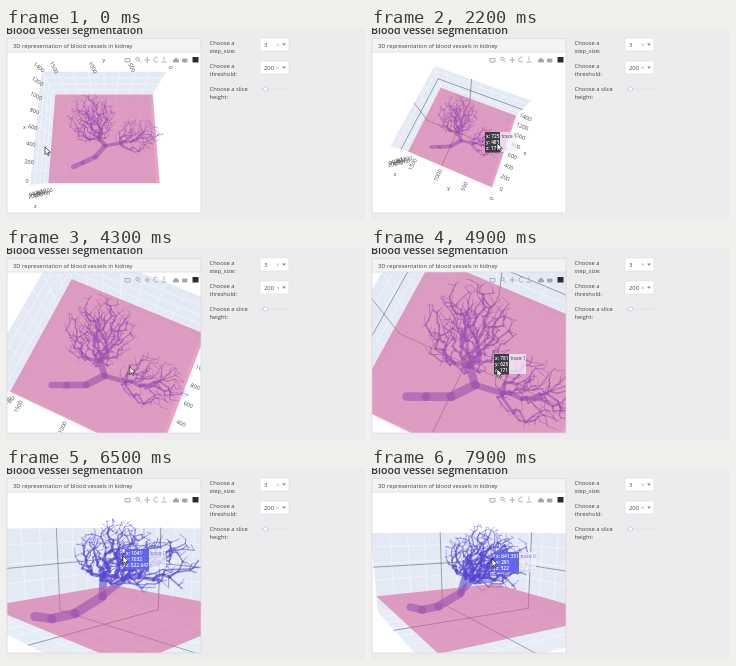
These frames come from a looping animation (359 px wide and 192 px high, 8000 ms). An HTML page with a canvas:

```html
<!DOCTYPE html>
<html lang="en">
<head>
<meta charset="utf-8">
<title>Blood vessel segmentation</title>
<style>
  html, body { margin: 0; width: 100%; height: 100%; overflow: hidden; background: #edebed; }
  canvas, svg { position: absolute; left: 0; top: 0; width: 359px; height: 192px; }
  text { font: 5.8px "Open Sans", "Noto Sans", sans-serif; fill: #444; }
  .title { font-size: 10.6px; font-weight: 600; fill: #333; }
  .box { fill: #fff; stroke: #dddbdf; stroke-width: .6; }
  .icon { fill: none; stroke: #a5a5ab; stroke-width: .9; }
</style>
</head>
<body>
<canvas id="plot"></canvas>
<svg viewBox="0 0 359 192">
  <text class="title" x="0" y="5.5">Blood vessel segmentation</text>
  <path d="M1 10.5H195V24H1Z" fill="#f4f3f4"/>
  <path d="M1 10.5H195V185H1ZM1 24H195" fill="none" stroke="#d9d7da" stroke-width=".7"/>
  <text x="7" y="19.5">3D representation of blood vessels in kidney</text>
  <g class="icon">
    <path d="M119 30.5H124V34H119Z"/>
    <circle cx="131.5" cy="31" r="1.7"/><path d="M133 32.5L135 34.5"/>
    <path d="M138.500 32H144M141.2 29V35"/>
    <path d="M151.500 29.5A2.5 2.5 0 1 0 152 33.5"/>
    <path d="M158 28.5V32.5M155.500 34H160.5"/>
    <path d="M167.500 32L170 30L172.500 32V34H167.500ZM176.500 31H181V34H176.500Z" fill="#a5a5ab"/>
  </g>
  <rect x="186.5" y="29" width="6" height="5.5" fill="#2a2a30"/>
  <text x="203.5" y="16.5">Choose a</text><text x="203.5" y="25">step_size:</text>
  <text x="203.5" y="39.8">Choose a</text><text x="203.5" y="48.3">threshold:</text>
  <text x="203.5" y="62.5">Choose a slice</text><text x="203.5" y="71">height:</text>
  <rect class="box" x="254" y="10" width="29" height="13" rx="1.5"/>
  <rect class="box" x="254" y="33" width="29" height="13" rx="1.5"/>
  <text x="258" y="18.7">3</text><text x="258" y="41.7">200</text>
  <path d="M270.500 15.500l2.400 2.400m0-2.400l-2.400 2.400M270.500 38.500l2.400 2.400m0-2.400l-2.400 2.400" stroke="#aaa" stroke-width=".6"/>
  <path d="M276 15.500h4l-2 2.300zM276 38.500h4l-2 2.300z" fill="#888"/>
  <path d="M254 61H283" stroke="#e2e1e6" stroke-width="1.2"/>
  <circle cx="259.5" cy="61" r="2.2" fill="#fff" stroke="#a9d3f0" stroke-width=".9"/>
</svg>
<script>
const cv = document.getElementById('plot'), c = cv.getContext('2d');
const dpr = window.devicePixelRatio || 1;
cv.width = 359 * dpr;
cv.height = 192 * dpr;

const FONT = '"Open Sans", "Noto Sans", sans-serif';
const W = .5, D = .4375, TOP = .38, LOW = -.1, EYE = 1.6; // half width, half depth, z limits, eye distance
const HOVER = [-.1, 0, .18];

// cam: yaw, tilt, scale, centre x and y, pointer x and y; tip: offset from the pointer
const stops = [
  { t: 0, cam: [0, .245, 104, 98, 108, 40, 123] },
  { t: 1300, cam: [.38, .25, 104, 97, 109, 108, 119], tip: [-7, -13], text: ['596.363', '777', '514'] },
  { t: 2200, cam: [.39, .25, 86, 93, 105, 127, 119], tip: [-13, -15], text: ['725', '483', '171'], slice: true },
  { t: 3600, cam: [.42, .25, 95, 95, 108, 122, 120], tip: [15, -7], text: ['693', '189', '549.647'] },
  { t: 4900, cam: [.43, .22, 200, 112, 119, 127, 125], tip: [-4, -19], text: ['781', '625', '171'], slice: true },
  { t: 6500, cam: [.8, 1.32, 205, 112, 141, 118, 92], tip: [1, -11], text: ['1041', '1032', '522.647'] },
  { t: 7900, cam: [1.05, 1.32, 183, 107, 137, 122, 95], tip: [2, -11], text: ['641.351', '291', '522'] }
];

function pose(t) {
  let i = 0;
  while (i < stops.length - 2 && t >= stops[i + 1].t) i++;
  const a = stops[i], b = stops[i + 1];
  const k = Math.min(1, (t - a.t) / (b.t - a.t)), ease = k * k * (3 - 2 * k);
  return a.cam.map((v, j) => v + (b.cam[j] - v) * ease);
}

// Orbit camera with perspective; returns x, y and local scale.
function camera(yaw, tilt, scale, cx, cy) {
  const cw = Math.cos(yaw), sw = Math.sin(yaw), ct = Math.cos(tilt), st = Math.sin(tilt);
  return ([x, y, z]) => {
    const rx = x * cw - y * sw, ry = x * sw + y * cw;
    const s = scale / Math.max(.15, 1 - (ry * st + z * ct) / EYE);
    return [cx + rx * s, cy + (ry * ct - z * st) * s, s];
  };
}

// Vessel tree: scattered tips, each joined to the best node nearer the hub.
let seed = 11;
const rnd = () => (seed = (seed * 16807) % 2147483647) / 2147483647;
const dist = (a, b) => Math.hypot(a[0] - b[0], a[1] - b[1], a[2] - b[2]);

function scatter(n, mid, radii) {
  return Array.from({ length: n }, () => {
    const a = rnd() * 2 * Math.PI, k = 2 * rnd() - 1, r = rnd() ** .4, q = Math.sqrt(1 - k * k);
    const dir = [q * Math.cos(a), q * Math.sin(a), k];
    return mid.map((m, i) => m + dir[i] * r * radii[i]);
  });
}

const nodes = [];
function join(p, parent) {
  const path = parent ? parent.path + dist(p, parent.p) : 0;
  nodes.push({ p, parent, path, load: 0 });
  return nodes[nodes.length - 1];
}
const hub = [.01, .11, .08];
let stem = null;
for (const p of [[-.29, .29, -.04], [-.2, .25, -.04], [-.08, .2, 0], hub]) stem = join(p, stem);
const tips = [...scatter(520, [-.1, -.09, .26], [.21, .22, .17]), ...scatter(260, [.28, .06, .25], [.19, .16, .13])];
tips.sort((a, b) => dist(a, hub) - dist(b, hub));
for (const p of tips) {
  let best = stem, cost = Infinity;
  for (const n of nodes.slice(3)) {
    const d = dist(p, n.p) + .25 * (n.path - stem.path);
    if (d < cost) { best = n; cost = d; }
  }
  join(p, best);
}
for (const n of nodes) for (let m = n; m; m = m.parent) m.load++;

function trace(points) {
  c.beginPath();
  for (const [x, y] of points) c.lineTo(x, y);
}
function line(points, color, width) {
  trace(points);
  c.strokeStyle = color;
  c.lineWidth = width;
  c.stroke();
}
function fill(points, color) {
  trace(points);
  c.fillStyle = color;
  c.fill();
}
const level = (P, z) => [[-W, -D, z], [W, -D, z], [W, D, z], [-W, D, z]].map(P);

function walls(P) {
  fill(level(P, LOW), '#e6edf7');
  for (let s = -1; s <= 1; s += .25) {
    line([P([s * W, -D, LOW]), P([s * W, D, LOW])], '#f6f9ff', .6);
    line([P([-W, s * D, LOW]), P([W, s * D, LOW])], '#f6f9ff', .6);
  }
  for (const at of [(s, z) => [s * W, -D, z], (s, z) => [-W, s * D, z]]) {
    fill([at(-1, LOW), at(1, LOW), at(1, TOP), at(-1, TOP)].map(P), '#e3eaf5');
    for (let s = -1; s <= 1; s += .25) line([P(at(s, LOW)), P(at(s, TOP))], '#f6f9ff', .6);
    for (let z = 0; z < TOP; z += .1) line([P(at(-1, z)), P(at(1, z))], '#f6f9ff', .6);
  }
}

function vessels(P) {
  for (const n of nodes) {
    if (!n.parent) continue;
    const a = P(n.p), b = P(n.parent.p);
    line([a, b], 'rgba(85,72,208,.6)', Math.max(.4, .003 * a[2] * n.load ** .4));
  }
}

function label(s, x, y, rot = 0) {
  c.save();
  c.translate(x, y);
  c.rotate(rot);
  c.fillText(s, 0, 0);
  c.restore();
}

function axes(P, back) {
  c.font = '5.5px ' + FONT;
  c.fillStyle = '#444';
  c.textAlign = 'center';
  c.textBaseline = 'middle';
  const xAt = n => P(back ? [-W, D - n / 1600, TOP] : [W, D - n / 1600, 0]);
  const yAt = n => P(back ? [W - n / 1600, -D, TOP] : [W - n / 1600, D, 0]);
  for (let n = 0; n <= 1400; n += 200) {
    const [x, y] = xAt(n);
    label(n, x + (back ? -3 : 9), y + (back ? -4 : 2), back ? n / 2000 : .4);
  }
  for (let n = 0; n <= 1500; n += 500) {
    const [x, y] = yAt(n);
    label(n, x + (back ? 4 : 0), y + (back ? -4 : 11), back ? 1.1 : -1.1);
  }
  const [zx, zy] = P([-W, D, 0]);
  for (let n = 0; n < 7; n++) label(n * 200, zx - 18 + n * 2.7, zy + 12 - n * .7 + n % 2 * 2, -.1);
  const [xx, xy] = xAt(700), [yx, yy] = yAt(800);
  label('x', xx + (back ? -12 : 20), xy + 4);
  label('y', yx, yy + (back ? -11 : 20));
  label('z', zx - 13, zy + 23);
}

function spikes(P, [x, y, z]) {
  for (const ends of [[[-W, -D, z], [W, -D, z]], [[-W, -D, z], [-W, D, z]], [[x, -D, LOW], [x, -D, TOP]],
    [[-W, y, LOW], [-W, y, TOP]], [[x, -D, LOW], [x, D, LOW]], [[-W, y, LOW], [W, y, LOW]]])
    line(ends.map(P), 'rgba(60,55,70,.75)', .6);
}

function tooltip({ tip, text, slice }, mx, my) {
  const x = mx + tip[0], y = my + tip[1], w = slice ? 15 : 24, color = slice ? '#3d3b43' : '#6166ea';
  c.textAlign = 'left';
  c.textBaseline = 'alphabetic';
  c.fillStyle = 'rgba(240,240,252,.75)';
  c.fillRect(x + w, y, 17, 20);
  c.fillStyle = color;
  c.fillRect(x, y, w, 20.5);
  c.font = '4.8px ' + FONT;
  c.fillText('trace ' + (slice ? 1 : 0), x + w + 1.5, y + 6);
  c.font = '600 4.8px ' + FONT;
  c.fillStyle = '#fff';
  text.forEach((s, i) => c.fillText('xyz'[i] + ': ' + s, x + 1, y + 6 + i * 6.2));
}

function arrow(x, y) {
  const shape = [[0, 0], [0, 7.5], [1.8, 6], [3, 8.6], [4.2, 8], [3, 5.5], [5.4, 5.3], [0, 0]]
    .map(([a, b]) => [x + a - 1, y + b - 4]);
  fill(shape, '#fff');
  line(shape, '#222', .7);
}

function draw(t) {
  const [yaw, tilt, scale, cx, cy, mx, my] = pose(t);
  const P = camera(yaw, tilt, scale, cx, cy);
  const hover = stops.find(s => s.tip && Math.abs(t - s.t) <= 400);
  c.setTransform(dpr, 0, 0, dpr, 0, 0);
  c.clearRect(0, 0, 359, 192);
  c.save();
  c.beginPath();
  c.rect(1, 24, 194, 161);
  c.clip();
  c.fillStyle = '#fff';
  c.fillRect(1, 24, 194, 161);
  c.lineCap = c.lineJoin = 'round';
  walls(P);
  if (hover) spikes(P, HOVER);
  vessels(P);
  fill(level(P, 0), 'rgba(214,89,148,.55)');
  if (tilt < .5) axes(P, yaw < .19);
  if (hover) tooltip(hover, mx, my);
  arrow(mx, my);
  c.restore();
}

let last = -1;
function tick() {
  const t = Math.floor(performance.now() % 8000 / 100) * 100;
  if (t !== last) draw(last = t);
  requestAnimationFrame(tick);
}
tick();
</script>
</body>
</html>
```
